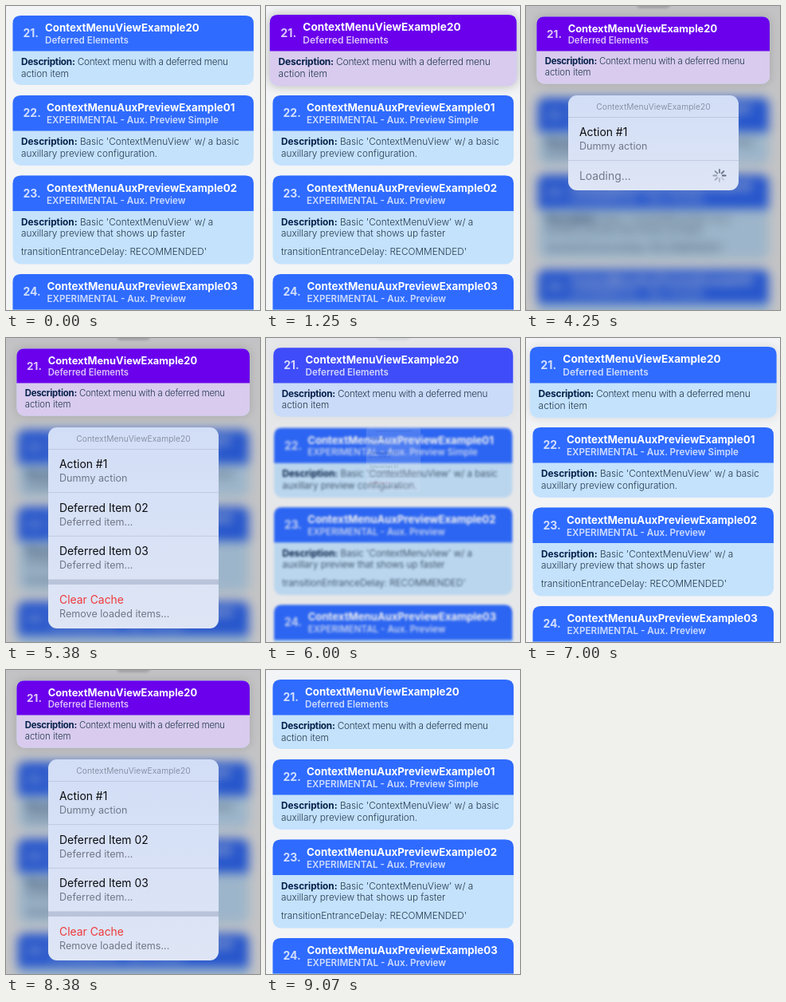
These frames come from a looping animation (319x381 px, 9260 ms). An HTML page:

```html
<!DOCTYPE html>
<html lang="en">
<head>
<meta charset="utf-8">
<title>Context menu with deferred items</title>
<style>
  html, body { margin: 0; width: 100%; height: 100%; overflow: hidden; }
  #stage { position: relative; width: 319px; height: 381px; overflow: hidden; background: #f3f4f6;
    font-family: Inter, Roboto, sans-serif; }
  #stage > * { position: absolute; }
  svg { display: block; overflow: visible; width: 319px; height: 381px; }
  #list, #card { left: 0; top: 0; }
  #list { transform-origin: 160px 190px; }
  #card { transform-origin: 160px 55.7px; }
  #dim { inset: 0; background: #000; }
  #grip { left: 139px; top: -7px; width: 42px; height: 10px; border-radius: 6px; background: #8d8d92; filter: blur(1.5px); }
  #menu { left: 53px; top: 112px; width: 214px; border-radius: 11px; overflow: hidden;
    background: linear-gradient(#d2def7, #dee5f5); transform-origin: 50% 0; }
  .num { font: 700 14px Inter, sans-serif; fill: #fff; opacity: .78; }
  .title { font: 700 13.3px Inter, sans-serif; fill: #fff; }
  .sub { font: 600 11.7px Inter, sans-serif; fill: #fff; opacity: .76; }
  .text { font: 300 11.8px Inter, sans-serif; fill: #24384f; }
  .text tspan { font-weight: 700; fill: #06204a; }
  .head { font: 400 10.3px Inter, sans-serif; fill: #8a93a6; text-anchor: middle; }
  .item { font: 400 13.9px Inter, sans-serif; fill: #0b0c10; }
  .note { font: 400 12.6px Inter, sans-serif; fill: #6f7788; }
  .wait { fill: #737b8b; }
  .red { fill: #f03a3c; }
  .line { fill: #b9c3d9; }
</style>
</head>
<body>
<div id="stage">
  <svg id="list"></svg>
  <div id="dim"></div>
  <div id="grip"></div>
  <svg id="card"></svg>
  <div id="menu"><svg id="rows"></svg></div>
</div>
<script>
const $ = id => document.getElementById(id);
const text = (cls, x, y, str, extra = '') => `<text class="${cls}" x="${x}" y="${y}" ${extra}>${str}</text>`;

function panel(y, height, head, body) {
  return `<rect x="8.5" y="${y}" width="302.5" height="${height}" rx="10" fill="${body}"/>
    <path d="M8.5 ${y + 44.5}V${y + 10}q0-10 10-10H301q10 0 10 10V${y + 44.5}z" fill="${head}"/>`;
}

function card({ y, height, num, x, title, sub, lines, tint = '', spacing = 0 }) {
  const offsets = [62, 76.5, 99.5];
  const body = lines.map((line, i) => text('text', 19, y + offsets[i],
    i ? line : `<tspan>Description:</tspan> ${line}`,
    i ? '' : `letter-spacing="${spacing}"`)).join('');
  return panel(y, height, '#2f6bff', '#c4e2fc') + tint +
    text('num', 21.5, y + 27, num + '.') + text('title', x, y + 20, title) +
    text('sub', x, y + 35, sub) + body;
}

$('list').innerHTML = [
  { y: 112, height: 88, num: 22, x: 51, title: 'ContextMenuAuxPreviewExample01',
    sub: 'EXPERIMENTAL - Aux. Preview Simple',
    lines: ["Basic 'ContextMenuView' w/ a basic", 'auxillary preview configuration.'] },
  { y: 212.5, height: 111, num: 23, x: 51, title: 'ContextMenuAuxPreviewExample02',
    sub: 'EXPERIMENTAL - Aux. Preview',
    lines: ["Basic 'ContextMenuView' w/ a", 'auxillary preview that shows up faster',
      "transitionEntranceDelay: RECOMMENDED'"] },
  { y: 336, height: 111, num: 24, x: 51.5, title: 'ContextMenuAuxPreviewExample03',
    sub: 'EXPERIMENTAL - Aux. Preview', lines: [] }
].map(card).join('');

$('card').innerHTML = card({
  y: 12, height: 87, num: 21, x: 49, title: 'ContextMenuViewExample20', sub: 'Deferred Elements',
  lines: ['Context menu with a deferred menu', 'action item'], spacing: -.25,
  tint: `<g id="purple">${panel(12, 87, '#6a00ec', '#d8cbee')}</g>`
});

const rule = (y, height = .8) => `<rect class="line" y="${y}" width="214" height="${height}"/>`;
const row = (y, name, note, cls = '') => text('item ' + cls, 14, y, name) + text('note', 14, y + 17, note);
const spokes = Array.from({ length: 8 }, (_, i) =>
  `<path class="spoke" d="M0-3.8V-7.6" transform="rotate(${i * 45})" stroke="#606a7c" stroke-width="2" stroke-linecap="round"/>`).join('');

$('rows').innerHTML = text('head', 107, 18, 'ContextMenuViewExample20') + rule(27) +
  row(51, 'Action #1', 'Dummy action') + rule(81.3) +
  `<g id="loading">${text('item wait', 14, 106, 'Loading...')}<g transform="translate(190 100.5)">${spokes}</g></g>
  <g id="loaded">${row(105.5, 'Deferred Item 02', 'Deferred item...')}${rule(135.8)}
    ${row(160, 'Deferred Item 03', 'Deferred item...')}${rule(190.5, 6.5)}
    ${row(221, 'Clear Cache', 'Remove loaded items...', 'red')}</g>`;

// Each track is a list of [ms, value]
const tracks = {
  scale: [[0, 1], [750, 1], [1125, 1.024], [1250, 1.024], [1375, 1], [1500, .974], [1750, .967],
    [5625, .967], [5750, .975], [6000, .995], [6250, 1], [6625, 1], [7000, 1.024], [7125, 1.012],
    [7375, .971], [7500, .967], [8750, .967], [8875, .985], [9070, 1]],
  purple: [[0, 0], [1000, 0], [1250, 1], [5625, 1], [5750, .85], [6125, 0], [7000, 0], [7125, .8],
    [7250, 1], [8750, 1], [8875, .6], [9070, 0]],
  back: [[0, 0], [1250, 0], [1375, .4], [1625, 1], [5625, 1], [5750, .8], [6125, 0], [7000, 0],
    [7125, .3], [7375, 1], [8750, 1], [8875, .5], [9070, 0]],
  menu: [[0, 0], [1250, 0], [1375, .25], [1500, .75], [1625, .96], [1750, 1], [5625, 1], [5750, .75],
    [6000, .15], [6125, 0], [7000, 0], [7125, .2], [7250, .7], [7375, .95], [7500, 1], [8750, 1],
    [8875, .45], [9070, 0]],
  grow: [[0, 0], [4500, 0], [4625, .5], [4750, .86], [4875, 1]]
};

function valueAt(track, t) {
  const next = track.findIndex(([time]) => time > t);
  if (next < 0) return track[track.length - 1][1];
  const [t0, v0] = track[next - 1], [t1, v1] = track[next];
  return v0 + (v1 - v0) * (t - t0) / (t1 - t0);
}

const LOOP = 9260, STEP = 125;
const stepped = t => t >= 9070 ? 9070 : Math.min(8875, Math.floor(t / STEP) * STEP);
const spokeNodes = document.querySelectorAll('.spoke');

function render(t) {
  const { scale, purple, back, menu, grow } = Object.fromEntries(
    Object.entries(tracks).map(([name, track]) => [name, valueAt(track, t)]));
  const shade = .12 * Math.max(0, (scale - 1) / .024) + .15 * purple;

  $('list').style.transform = `scale(${1 - .04 * back})`;
  $('list').style.filter = back ? `blur(${6.5 * back}px)` : 'none';
  $('dim').style.opacity = .2 * back;
  $('grip').style.opacity = .6 * back;
  $('card').style.transform = `scale(${scale})`;
  $('card').style.filter = shade ? `drop-shadow(0 0 6px rgba(0,0,0,${shade}))` : 'none';
  $('purple').style.opacity = purple;

  const box = $('menu').style;
  box.height = `${119 + 132.5 * grow}px`;
  box.transform = `scale(${.2 + .8 * menu})`;
  box.opacity = Math.min(1, menu * 1.3);
  $('loading').style.opacity = 1 - grow;
  $('loaded').style.opacity = grow;
  const lead = Math.floor(t / STEP) % 8;
  spokeNodes.forEach((spoke, i) => { spoke.style.opacity = 1 - .11 * ((lead - i + 8) % 8); });
}

const start = performance.now();
function tick() {
  render(stepped((performance.now() - start) % LOOP));
  requestAnimationFrame(tick);
}
tick();
</script>
</body>
</html>
```
